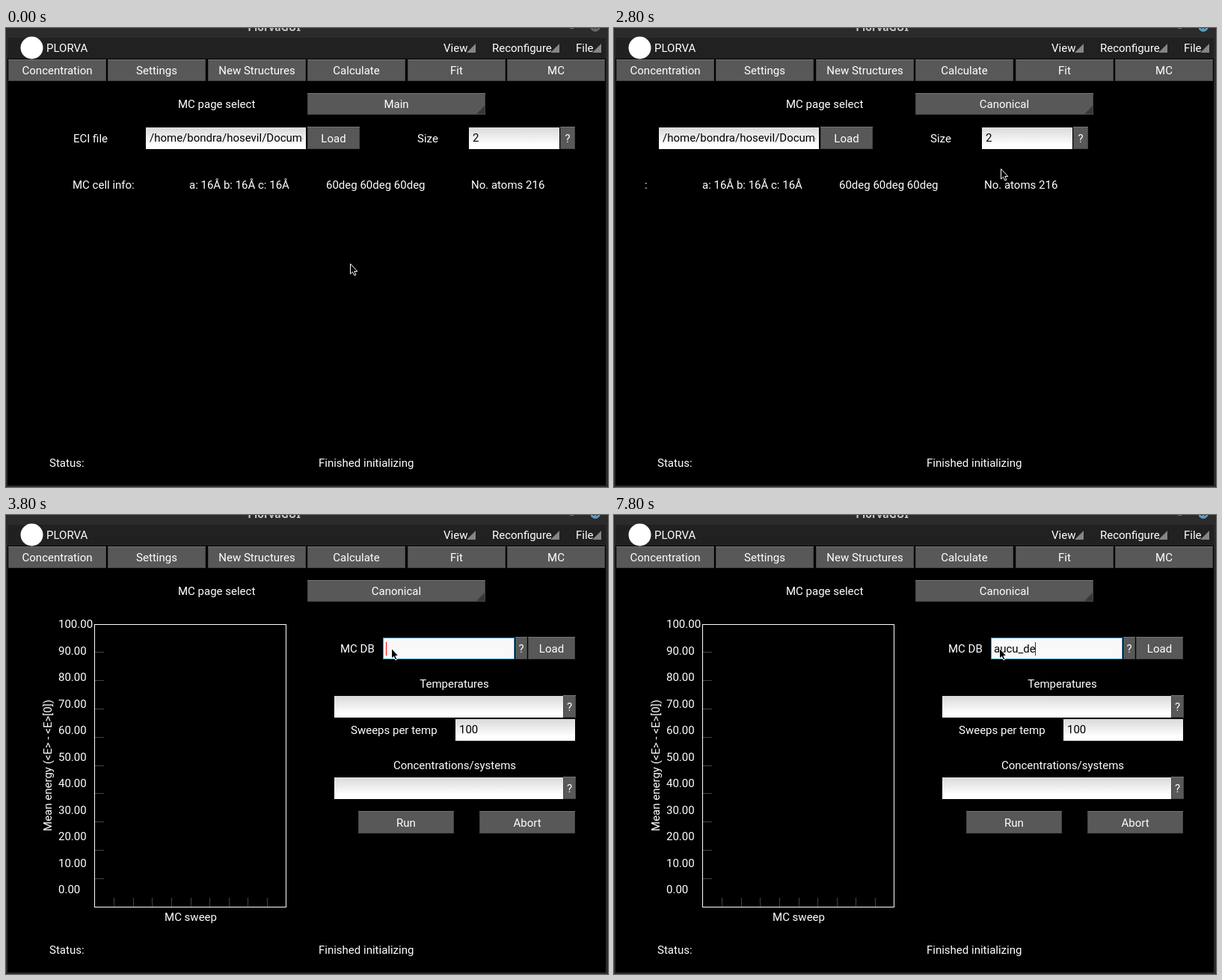
These frames come from a looping animation (805 by 614 pixels, 8000 ms). An HTML page with a canvas:

```html
<!DOCTYPE html>
<html lang="en">
<head>
<meta charset="utf-8">
<title>Monte Carlo page</title>
<style>
html, body { margin: 0; width: 100%; height: 100%; overflow: hidden; background: #000; }
canvas { display: block; }
</style>
</head>
<body>
<canvas id="stage" width="805" height="614"></canvas>
<script>
const ctx = document.getElementById('stage').getContext('2d');
const LOOP = 8000, STEP = 200;
const FONT = '15px Roboto, sans-serif';
const PAGE = { x: 42, w: 720 };
const TYPED = [
  [4800, 'a'], [5000, 'au'], [5400, 'auc'], [5600, 'aucu'], [5800, 'aucuu'],
  [6400, 'auc'], [6800, 'aucu'], [7400, 'aucu_'], [7600, 'aucu_d'], [7800, 'aucu_de']
];
// Pointer moves: start, end, from, to
const MOVES = [
  [0, 1200, [460, 315], [526, 107]],
  [1600, 2400, [526, 107], [517, 188]],
  [3400, 3800, [517, 188], [515, 178]]
];

function box(x, y, w, h, color) {
  ctx.fillStyle = color;
  ctx.fillRect(x, y, w, h);
}

function text(str, x, y, color = '#fff', align = 'left') {
  ctx.fillStyle = color;
  ctx.textAlign = align;
  ctx.fillText(str, x, y);
}

function poly(points, color) {
  ctx.beginPath();
  points.forEach(([x, y]) => ctx.lineTo(x, y));
  ctx.closePath();
  ctx.fillStyle = color;
  ctx.fill();
}

function corner(x, y, size, color) {
  poly([[x, y], [x, y - size], [x - size, y]], color);
}

function button(label, x, y, w, h) {
  box(x, y, w, h, '#464646');
  box(x, y, w, 1, '#747474');
  box(x + 1, y + 1, w - 2, h - 2, '#585858');
  text(label, x + w / 2, y + h / 2 + 5.5, '#fff', 'center');
}

function input(str, x, y, w, h = 29) {
  const shade = ctx.createLinearGradient(0, y, 0, y + h);
  shade.addColorStop(0, '#d9d9d9');
  shade.addColorStop(0.8, '#fff');
  box(x, y, w, h, shade);
  ctx.save();
  ctx.beginPath();
  ctx.rect(x, y, w - 4, h);
  ctx.clip();
  text(str, x + 5, y + 19, '#000');
  ctx.restore();
}

function frameAndMenu(active) {
  box(0, 0, 805, 614, '#2b2b2b');
  box(2, 13, 800, 28, '#212121');
  box(2, 41, 800, 571, '#000');

  ctx.font = 'bold 14px "Noto Sans", sans-serif';
  text('PlorvaGUI', 358.5, 4, '#c8c8c8', 'center');
  ctx.font = FONT;
  box(754, 0, 5, 1, '#777');
  ctx.beginPath();
  ctx.arc(788, -1.5, 6.5, 0, 7);
  ctx.fillStyle = active ? '#5b9cc4' : '#656565';
  ctx.fill();
  box(785, 0, 2, 1, '#2b2b2b');
  box(789, 0, 2, 1, '#2b2b2b');

  ctx.beginPath();
  ctx.arc(34.5, 26.5, 15, 0, 7);
  ctx.fillStyle = '#fff';
  ctx.fill();
  text('PLORVA', 54, 32);
  [['View', 585, 628], ['Reconfigure', 650, 740], ['File', 762, 796]].forEach(([name, x, end]) => {
    corner(end, 33, 12, '#858585');
    text(name, x, 32);
  });
  ['Concentration', 'Settings', 'New Structures', 'Calculate', 'Fit', 'MC'].forEach((name, i) =>
    button(name, Math.round(3 + i * 133.4), 42, 131, 29));

  text('MC page select', 230, 107);
  text('Status:', 58, 587);
  text('Finished initializing', 418, 587);
}

function spinner(value) {
  button(value, 403, 87, 238, 29);
  corner(640, 115, 11, '#383838');
}

function mainPage() {
  text('ECI file', 90, 153);
  input('/home/bondra/hosevil/Documents', 187, 133, 214);
  button('Load', 403, 132, 70, 30);
  text('Size', 550, 153);
  input('2', 619, 133, 121);
  button('?', 741, 132, 20, 30);
  text('MC cell info:', 89, 215);
  text('a: 16Å b: 16Å c: 16Å', 245, 215);
  text('60deg 60deg 60deg', 428, 215);
  text('No. atoms 216', 622, 215);
}

function canonicalPage() {
  text('MC DB', 447, 184);
  input('', 504, 164, 176);
  button('?', 681, 163, 16, 30);
  button('Load', 698, 163, 63, 30);
  text('Temperatures', 599.5, 231, '#fff', 'center');
  input('', 439, 242, 306);
  button('?', 745, 241, 17, 30);
  text('Sweeps per temp', 461, 293);
  input('100', 601, 273, 160);
  text('Concentrations/systems', 600, 340, '#fff', 'center');
  input('', 439, 351, 306);
  button('?', 745, 350, 17, 30);
  button('Run', 471, 396, 128, 30);
  button('Abort', 633, 396, 128, 30);
}

function chart() {
  for (let i = 1; i < 10; i++) {
    box(119, Math.round(145.5 + i * 37.8), 12, 1, '#444');
    box(Math.round(118.5 + i * 25.6), 512, 1, 12, '#444');
  }
  ctx.strokeStyle = '#fff';
  ctx.lineWidth = 1;
  ctx.strokeRect(118.5, 146.5, 256, 378);
  for (let i = 0; i <= 10; i++) text((100 - i * 10).toFixed(2), 70, Math.round(151 + i * 35.5));
  text('MC sweep', 247, 543, '#fff', 'center');
  ctx.save();
  ctx.translate(61, 335);
  ctx.rotate(-Math.PI / 2);
  text('Mean energy (<E> - <E>[0])', 0, 0, '#fff', 'center');
  ctx.restore();
}

function typing(t) {
  const last = TYPED.filter(([at]) => at <= t).pop();
  const str = last ? last[1] : '';
  box(504, 164, 176, 29, '#3a9fd0');
  box(505, 165, 174, 27, '#f9f9f9');
  text(str, 508, 184, '#000');
  if (t < 4400 || t >= 4800) {
    const x = Math.floor(508 + ctx.measureText(str).width);
    box(x, 170, 1, 18, t < 7400 ? '#f00' : '#333');
  }
}

function pages(t) {
  const k = Math.min(1, Math.max(0, (t - 2747) / 571));
  const shift = PAGE.w * (1 - (1 - k) ** 2);
  ctx.save();
  ctx.beginPath();
  ctx.rect(PAGE.x, 71, PAGE.w, 490);
  ctx.clip();
  [[mainPage, -shift], [canonicalPage, PAGE.w - shift]].forEach(([page, dx]) => {
    ctx.save();
    ctx.translate(Math.round(dx), 0);
    page();
    ctx.restore();
  });
  ctx.restore();
  if (k === 1) chart();
}

function pointer(t) {
  const [start, end, from, to] = MOVES.filter(m => m[0] <= t).pop();
  const k = Math.min(1, (t - start) / (end - start));
  const ease = (1 - Math.cos(Math.PI * k)) / 2;
  const [x, y] = from.map((v, i) => Math.round(v + (to[i] - v) * ease));
  const shape = [[0, 0], [0, 13.5], [3, 10.8], [5.3, 15.5], [7.5, 14.5], [5.3, 10], [9.3, 10]];
  poly(shape.map(([px, py]) => [x + px + 0.5, y + py + 0.5]), '#000');
  ctx.strokeStyle = '#fff';
  ctx.lineWidth = 1;
  ctx.stroke();
}

function draw(now) {
  const t = Math.floor(now % LOOP / STEP) * STEP;
  ctx.font = FONT;
  frameAndMenu(t >= 1200);
  pages(t);
  spinner(t < 2800 ? 'Main' : 'Canonical');
  if (t >= 1400 && t < 2800) {
    box(403, 117, 238, 95, '#000');
    button('Main', 403, 117, 238, 47);
    button('Canonical', 403, 165, 238, 47);
  }
  if (t >= 3800) typing(t);
  pointer(t);
}

let begin;
function tick(now) {
  begin ??= now;
  draw(now - begin);
  requestAnimationFrame(tick);
}
draw(0);
requestAnimationFrame(tick);
</script>
</body>
</html>
```
